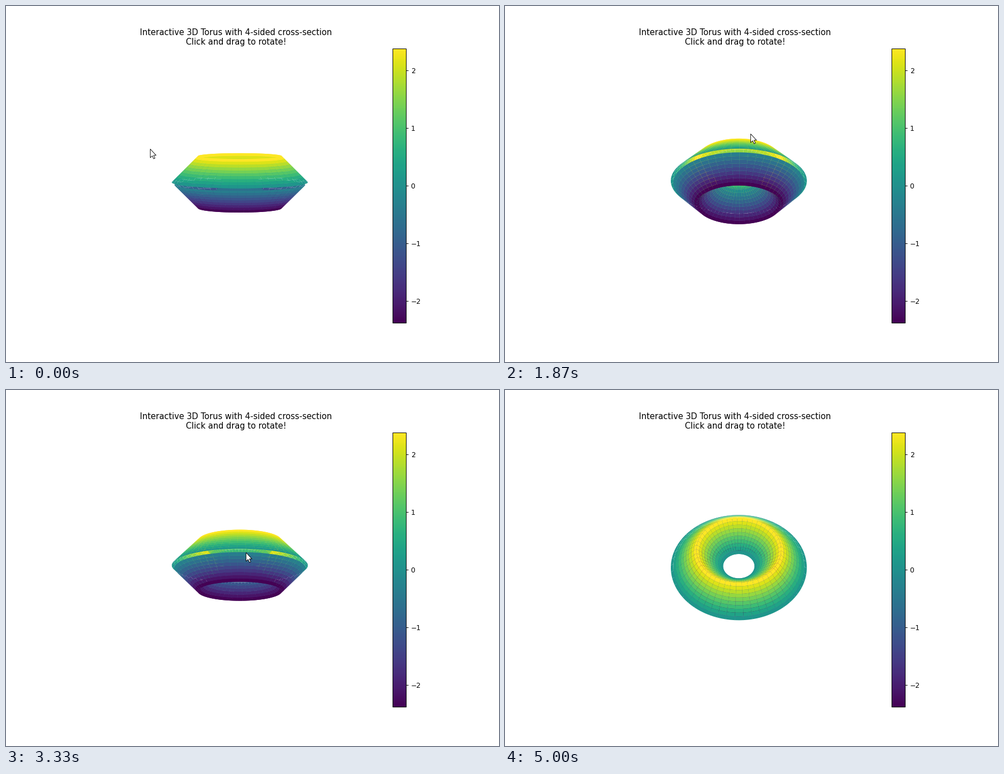
These frames come from a looping animation (880x636 px, 5.8 s). A matplotlib script:

```python
import numpy as np
import matplotlib.pyplot as plt
from matplotlib.animation import FuncAnimation
from matplotlib.patches import Polygon

W, H, DPI = 880, 636, 88
FRAMES, LOOP_MS = 87, 5800
R, r, SIDES, PER_SIDE = 4.0, 2.5, 4, 10
GRAB, RELEASE, GONE = 12, 69, 75
ELEV0, AZIM0 = 5, -60
DEG_PER_PX = 180 / (0.77 * H)  # a drag across the axes height turns 180 degrees

# Pointer stops: frame, x, y in pixels from the top left
STOPS = np.array([
    (0, 257, 255), (5, 430, 336), (GRAB, 430, 336), (21, 434, 313),
    (35, 441, 142), (42, 432, 258), (54, 426, 310), (65, 426, 445),
    (RELEASE, 426, 460.5), (74, 166, 622)])
ARROW = np.array([(0, 0), (0, 15.5), (3.6, 12.2), (6, 17.5), (8.4, 16.5),
                  (6, 11.3), (10.5, 11.3)]) + 0.5


def pointer(i):
    """Pointer position at frame i, eased in and out of every stop."""
    frames, *coords = STOPS.T
    order = np.arange(len(STOPS))
    k, s = divmod(np.interp(i, frames, order), 1)
    s = k + s * s * (3 - 2 * s)
    return np.array([np.interp(s, order, c) for c in coords])


def cross_section():
    """Points along a regular polygon; the outline is left open at its end."""
    a = 2 * np.pi * np.arange(SIDES + 1) / SIDES
    corners = r * np.column_stack([np.cos(a), np.sin(a)])
    s = np.arange(PER_SIDE)[:, None] / PER_SIDE
    return np.vstack([p + s * (q - p) for p, q in zip(corners, corners[1:])])


fig = plt.figure(figsize=(W / DPI, H / DPI), dpi=DPI)
ax = fig.add_subplot(projection="3d")

u = np.linspace(0, 2 * np.pi, 100)
ring, z = cross_section().T
X = np.outer(R + ring, np.cos(u))
Y = np.outer(R + ring, np.sin(u))
Z = np.outer(z, np.ones_like(u))
surf = ax.plot_surface(X, Y, Z, cmap="viridis")

lim = 1.2 * (R + r)
ax.set(xlim=(-lim, lim), ylim=(-lim, lim), zlim=(-lim, lim))
ax.set_box_aspect((1, 1, 1))
ax.set_axis_off()
ax.set_title(f"Interactive 3D Torus with {SIDES}-sided cross-section\n"
             "Click and drag to rotate!")
fig.colorbar(surf, ax=ax)

cursor = fig.add_artist(Polygon(ARROW, closed=True, fc="white", ec="black",
                                lw=0.7, zorder=10))


def update(i):
    # The view trails the pointer by one frame
    dx, dy = pointer(np.clip(i - 1, GRAB, RELEASE)) - pointer(GRAB)
    ax.view_init(elev=ELEV0 + dy * DEG_PER_PX, azim=AZIM0 - dx * DEG_PER_PX)
    pts = ARROW + np.round(pointer(i))
    cursor.set_xy(np.column_stack([pts[:, 0] / W, 1 - pts[:, 1] / H]))
    cursor.set_visible(i < GONE)
    return surf, cursor


anim = FuncAnimation(fig, update, frames=FRAMES, interval=LOOP_MS / FRAMES,
                     repeat=True, repeat_delay=0, blit=False)
plt.show()
```
